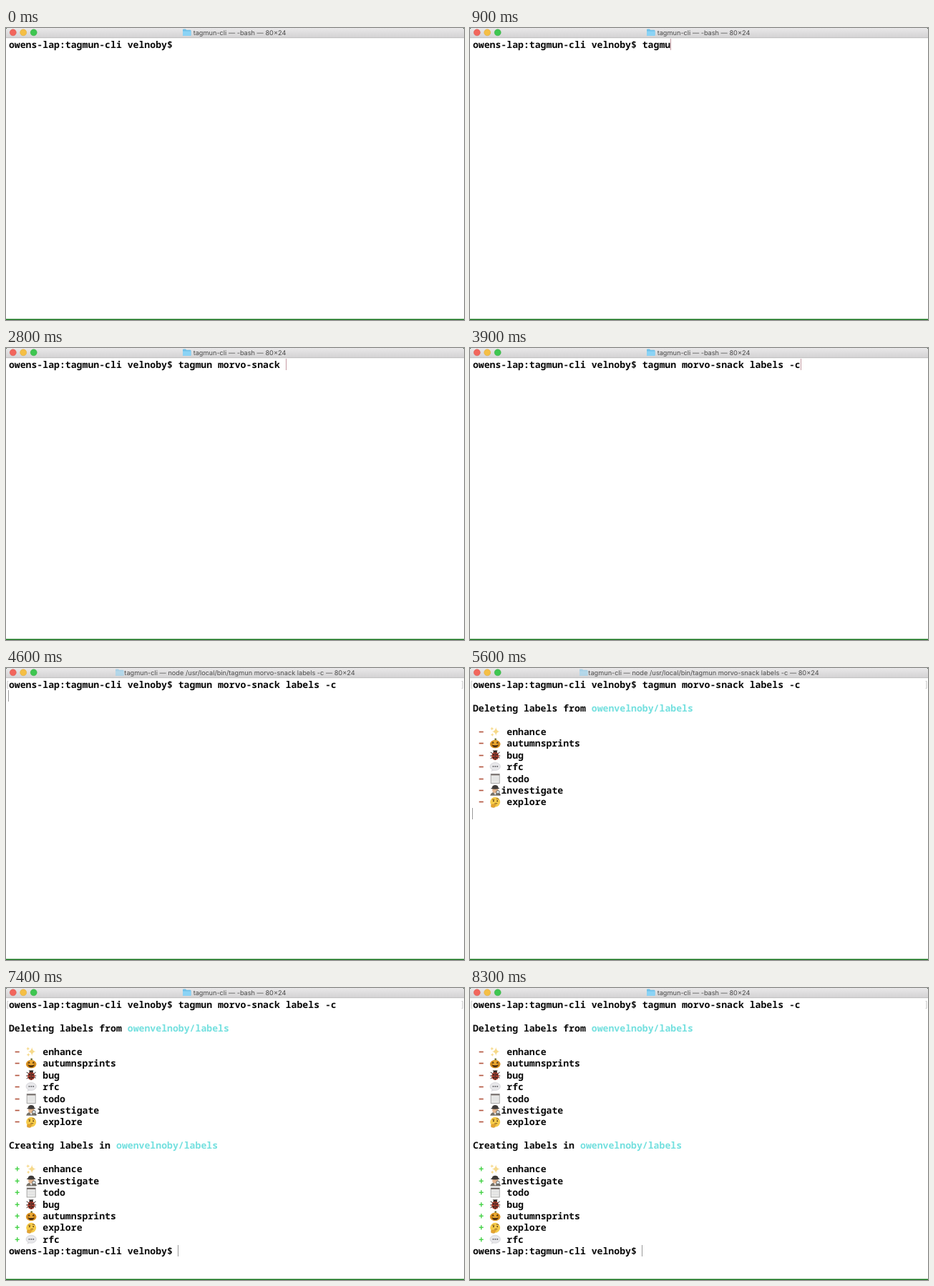
An HTML page that plays this animation: 640x409 px, repeating every 8.4 s.

```html
<!DOCTYPE html>
<html lang="en">
<head>
<meta charset="utf-8">
<title>Terminal</title>
<style>
  html, body { margin: 0; width: 100%; height: 100%; overflow: hidden; background: #fff; }
  svg { display: block; width: 640px; height: 409px; }
  text { white-space: pre; text-rendering: geometricPrecision; }
  .mono { font: 600 13.17px "Noto Sans Mono", "DejaVu Sans Mono", monospace; fill: #0b0b0b; }
  .title { font: 400 9.2px Inter, "Liberation Sans", sans-serif; fill: #4c4c4c; text-anchor: middle; }
  .repo { fill: #74e0df; font-weight: 700; }
  .minus { fill: #b4553f; }
  .plus { fill: #45d247; font-weight: 700; }
</style>
</head>
<body>
<svg viewBox="0 0 640 409">
  <defs>
    <linearGradient id="bar" x2="0" y2="1">
      <stop offset="0" stop-color="#e9e8e9"/>
      <stop offset="1" stop-color="#d3d2d3"/>
    </linearGradient>
    <!-- Icons are centred on the origin, about 15px wide. -->
    <g id="sparkle" fill="#f6d98a">
      <path d="M1-6Q1.6-.6 6.5 0Q1.6 .6 1 6Q.4 .6-4.5 0Q.4-.6 1-6Z"/>
      <path d="M-4.5-6.5Q-4.2-4.2-2-4Q-4.2-3.8-4.5-1.5Q-4.8-3.8-7-4Q-4.8-4.2-4.5-6.5Z"/>
      <path d="M-4 2Q-3.7 4.2-1.7 4.5Q-3.7 4.8-4 7Q-4.3 4.8-6.3 4.5Q-4.3 4.2-4 2Z"/>
    </g>
    <g id="pumpkin">
      <path d="M-1-4L-.5-7.2L2-6.6L1.4-4Z" fill="#6d7030"/>
      <ellipse cy="1" rx="7.3" ry="5.8" fill="#d9901e"/>
      <ellipse cy="1" rx="3.4" ry="5.6" fill="#eba932"/>
      <path d="M-4.8 0L-3-2.6L-1.3 0ZM1.3 0L3-2.6L4.8 0ZM-5 2Q0 3.4 5 2Q3 5.8 0 5.6Q-3 5.8-5 2Z" fill="#51300f"/>
    </g>
    <g id="beetle">
      <path d="M-6.5-4L6.5 4M-7 1H7M-6.5 5L6.5-4M-3-7L0-4L3-7" stroke="#302522" stroke-width="1" fill="none"/>
      <circle cy="-4" r="2.8" fill="#2b2422"/>
      <ellipse cy="1.4" rx="5" ry="5.6" fill="#b8402f"/>
      <path d="M0-4V7" stroke="#2b2422"/>
      <g fill="#2b2422">
        <circle cx="-2.5" cy="-.5" r="1.2"/><circle cx="2.5" cy="-.5" r="1.2"/>
        <circle cx="-2.3" cy="3.5" r="1.2"/><circle cx="2.3" cy="3.5" r="1.2"/>
      </g>
    </g>
    <g id="bubble">
      <path d="M-4 3L-6 6.8L0 4Z" fill="#dcdcdf"/>
      <ellipse cy="-.5" rx="7.2" ry="5.5" fill="#e7e7ea" stroke="#cfcfd3" stroke-width=".7"/>
      <path d="M-3.6-.5H4" stroke="#66666a" stroke-width="1.7" stroke-dasharray="1.7 1.2"/>
    </g>
    <g id="pad">
      <rect x="-6" y="-6.5" width="12" height="13" fill="#ededeb" stroke="#9b9b9a" stroke-width=".9"/>
      <path d="M-6-5.5H6" stroke="#77706d" stroke-width="2"/>
      <path d="M-4.5-2H4.5M-4.5 .5H4.5M-4.5 3H4.5" stroke="#c9cbce" stroke-width=".6"/>
    </g>
    <g id="sleuth">
      <path d="M-7 7.5Q-6 2.5 0 2.5Q6 2.5 7 7.5Z" fill="#777269"/>
      <path d="M-2 3L0 7L2 3Z" fill="#eee"/>
      <circle cy="-.2" r="4" fill="#e3b48c"/>
      <path d="M-6.5-2.4Q-4-3-3.6-6Q0-8.6 3.6-6Q4-3 6.5-2.4Q0-.8-6.5-2.4Z" fill="#3f3b39"/>
      <circle cx="3.8" cy="2.4" r="2.3" fill="#dce7eb" stroke="#514d4a" stroke-width=".8"/>
      <path d="M5.3 4.2L7.3 6.8" stroke="#514d4a" stroke-width="1.2"/>
    </g>
    <g id="thinker">
      <circle r="7" fill="#f6cb49"/>
      <circle cx="-2.3" cy="-1.5" r="1" fill="#5b3b17"/><circle cx="3" cy="-1.5" r="1" fill="#5b3b17"/>
      <path d="M-4-3.6H-1M1.5-4.5Q3.5-5.4 5-4M-1 2.3Q1 1.3 3 2" stroke="#6b471c" stroke-width=".9" fill="none"/>
      <path d="M-5.5 7Q-6.5 3-4 3.2L1.5 3.3Q2.4 4.4-1 4.7Q1 7.6-2.5 7.7Z" fill="#e5a52f" stroke="#c28424" stroke-width=".4"/>
    </g>
  </defs>
  <rect width="640" height="409" fill="#27432b"/>
  <path d="M0 408V3Q0 0 3 0H637Q640 0 640 3V408Z" fill="#fff"/>
  <path d="M0 14V3Q0 0 3 0H637Q640 0 640 3V14Z" fill="url(#bar)"/>
  <path d="M0 13.7H640" stroke="#b9b9b9" stroke-width=".8"/>
  <path d="M0 408.2H640" stroke="#15731b" stroke-width="1.6"/>
  <g stroke-width=".5">
    <circle cx="9.8" cy="6.3" r="4.5" fill="#f2665c" stroke="#d9554c"/>
    <circle cx="24.2" cy="6.3" r="4.5" fill="#f5bf45" stroke="#dca737"/>
    <circle cx="38.7" cy="6.3" r="4.5" fill="#3fc651" stroke="#34ab41"/>
  </g>
  <g id="folder">
    <path d="M0 2.5Q0 1.5 1 1.5H4L5.2 2.7H10.5Q11.5 2.7 11.5 3.7V10Q11.5 11 10.5 11H1Q0 11 0 10Z" fill="#6fc1e9"/>
    <path d="M0 4.5H11.5V10Q11.5 11 10.5 11H1Q0 11 0 10Z" fill="#8bd3f5"/>
  </g>
  <text id="title" class="title" x="326.5" y="10"></text>
  <g id="rows"></g>
  <path id="marks" d="M3.2 18.5H2V28.5H3.2M636.8 18.5H638V28.5H636.8" fill="none" stroke="#b5b5b5" stroke-width=".8"/>
  <rect id="cursor" width="1" height="16"/>
</svg>
<script>
const LOOP = 8400, STEP = 100;
const LEFT = 3.9, COL = 7.9, TOP = 14.6, ROW = 16.45;
const ENTER = 4400, RENAME = 4500, DELETED = 5600, CREATING = 5700, CREATED = 6200, DONE = 6300;

const host = "owens-lap:tagmun-cli velnoby$ ";
const command = "tagmun morvo-snack labels -c";
const repo = "owenvelnoby/labels";
const idleTitle = "tagmun-cli — -bash — 80×24";
const busyTitle = `tagmun-cli — node /usr/local/bin/${command} — 80×24`;

// Typing bursts: start, characters, gap between characters
const bursts = [[500, 7, 100], [1400, 2, 0], [1600, 1, 0], [1800, 3, 100],
                [2200, 2, 100], [2500, 10, 88], [3700, 3, 100]];
const keyTimes = bursts.flatMap(([start, count, gap]) =>
  Array.from({ length: count }, (_, i) => start + i * gap));

const labels = {
  enhance: "sparkle", autumnsprints: "pumpkin", bug: "beetle", rfc: "bubble",
  todo: "pad", investigate: "sleuth", explore: "thinker"
};
const deleted = Object.keys(labels);
const created = ["enhance", "investigate", "todo", "bug", "autumnsprints", "explore", "rfc"];

const byId = id => document.getElementById(id);
const [folder, title, rowsLayer, marks, cursor] =
  ["folder", "title", "rows", "marks", "cursor"].map(byId);

function make(tag, attrs, parent) {
  const node = document.createElementNS("http://www.w3.org/2000/svg", tag);
  for (const key in attrs) node.setAttribute(key, attrs[key]);
  return parent.appendChild(node);
}

const rows = [];
function addRow(row, time) {
  const group = make("g", { transform: `translate(${LEFT} ${TOP + row * ROW})` }, rowsLayer);
  rows.push({ group, time });
  return group;
}

function write(group, col, string, kind = "") {
  const node = make("text", { class: "mono " + kind, x: col * COL, y: 13.3 }, group);
  node.textContent = string;
  return node;
}

function addHeading(row, time, string) {
  const group = addRow(row, time);
  write(group, 0, string);
  write(group, string.length, repo, "repo");
}

function addLabel(row, time, name, sign, kind) {
  const group = addRow(row, time);
  write(group, 1, sign, kind);
  make("use", { href: "#" + labels[name], x: 31.3, y: 8.7 }, group);
  write(group, name === "investigate" ? 5 : 6, name);
}

const prompt = write(addRow(0, 0), 0, host);
addHeading(2, DELETED, "Deleting labels from ");
deleted.forEach((name, i) => addLabel(4 + i, DELETED, name, "−", "minus"));
addHeading(12, CREATING, "Creating labels in ");
created.forEach((name, i) => addLabel(14 + i, i < 6 ? CREATED : DONE, name, "+", "plus"));
write(addRow(21, DONE), 0, host);

function cursorCell(t, typed) {
  if (t >= DONE) return [host.length, 21];
  if (t >= CREATED) return [0, 20];
  if (t >= CREATING) return [0, 14];
  if (t >= DELETED) return [0, 11];
  if (t >= ENTER) return [0, 1];
  return [host.length + typed, 0];
}

function draw(time) {
  const t = Math.floor((time % LOOP) / STEP) * STEP;
  const typed = keyTimes.filter(k => k <= t).length;
  const busy = t >= RENAME && t < DONE;
  const [col, row] = cursorCell(t, typed);

  prompt.textContent = host + command.slice(0, typed);
  for (const { group, time: start } of rows) group.setAttribute("display", t >= start ? "inline" : "none");

  title.textContent = busy ? busyTitle : idleTitle;
  folder.setAttribute("transform", `translate(${busy ? 153 : 247} 0)`);
  folder.setAttribute("opacity", busy ? 0.5 : 1);
  marks.setAttribute("display", t >= ENTER ? "inline" : "none");

  cursor.setAttribute("display", t >= 100 ? "inline" : "none");
  cursor.setAttribute("x", Math.round(LEFT + col * COL - 0.5));
  cursor.setAttribute("y", Math.round(TOP + row * ROW));
  cursor.setAttribute("fill", t < ENTER ? "#c69ca3" : "#999");
}

const origin = performance.now();
function tick() {
  draw(performance.now() - origin);
  requestAnimationFrame(tick);
}
tick();
</script>
</body>
</html>
```
